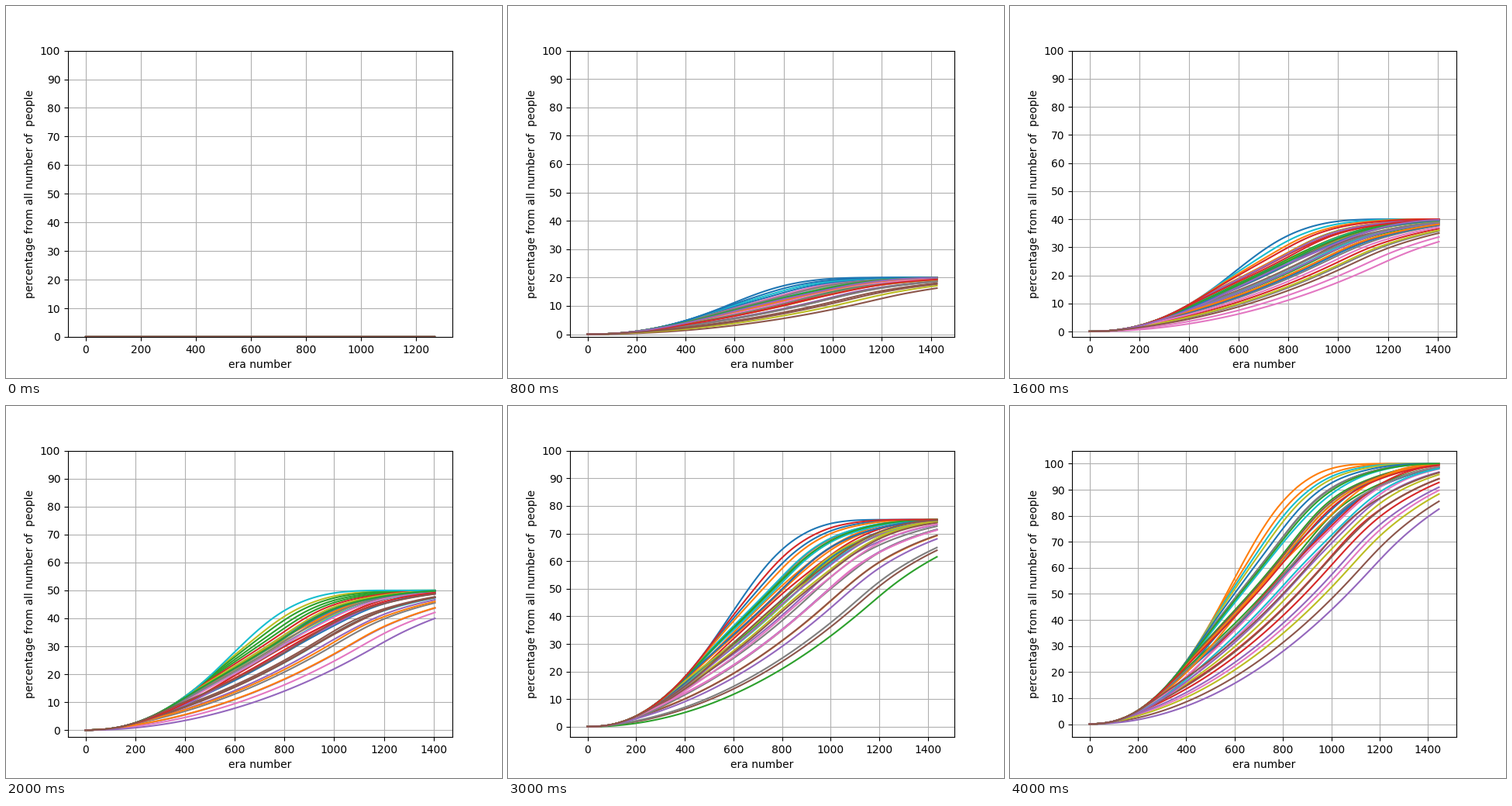
Write a matplotlib script that moves like this. It is 640x480 px and loops after 4200 ms.

```python
import numpy as np
import matplotlib.pyplot as plt
from matplotlib.animation import FuncAnimation

STEPS = 21
LINES = 36
ERA_STEP = 20
START_DELAY = 35
CROSSING_ERAS = 1185   # eras the news needs to cross the town
METRIC = 1.3           # between city-block and straight-line distance
FIRST_SHARE = 0.0004   # the one person who knows at the start

# Key points (step, last era) of the run length, joined by straight lines.
RUN_LENGTH = [(0, 1268), (1, 1450), (3, 1531), (4, 1425), (8, 1405),
              (12, 1405), (15, 1437), (16, 1544), (17, 1498), (18, 1553),
              (20, 1445)]

eras = np.arange(0, 1741, ERA_STEP)
cells = (np.arange(80) + 0.5) / 80
kernel = np.hanning(13)
kernel /= kernel.sum()


def source_point(level, tilt):
    """Source whose news reaches `level` percent of the town by era 800,
    between the diagonal (tilt 0) and the mid line (tilt 1)."""
    depth = np.interp(level, [26, 40, 54, 70, 80, 85], np.linspace(0, 0.5, 6))
    diagonal = np.array([depth, depth])
    edge = np.array([np.interp(level, [45, 85], [0, 0.5]), 0.5])
    return (1 - tilt) * diagonal + tilt * edge


def spread(source):
    """Share of the town reached in each era by a front leaving the source."""
    dx, dy = (np.abs(cells - c) ** METRIC for c in source)
    distance = (dx[:, None] + dy[None, :]) ** (1 / METRIC)
    arrival = START_DELAY + CROSSING_ERAS * distance
    counts, _ = np.histogram(arrival, bins=eras)
    share = np.concatenate([[0], np.cumsum(counts)]) / distance.size
    share = np.convolve(share, kernel, mode="same")
    share[0] = FIRST_SHARE
    return share


def choose_sources(step, rng):
    """Most runs bunch around the middle; the bunch loosens with each step."""
    line = np.arange(LINES)
    pace = rng.normal(size=LINES) + 0.8 * np.cos(2 * np.pi * (line - 0.5) / 10)
    rank = np.argsort(np.argsort(pace))
    offset = 2 * rank / (LINES - 1) - 1
    looseness = 0.2 + 0.5 * step / (STEPS - 1)
    levels = 55 + 27 * (looseness * offset + (1 - looseness) * offset ** 3)
    tilts = rng.random(LINES) * (1 - np.abs(offset))
    return [source_point(level, tilt) for level, tilt in zip(levels, tilts)]


def draw(step):
    rng = np.random.default_rng(100 + step)
    x = np.linspace(0, np.interp(step, *zip(*RUN_LENGTH)), 90)
    ax.clear()
    for source in choose_sources(step, rng):
        ax.plot(x, 5 * step * np.interp(x, eras, spread(source)))
    ax.set_yticks(np.arange(0, 101, 10))
    ax.set_xlabel("era number")
    ax.set_ylabel("percentage from all number of  people")
    ax.grid(True)


fig, ax = plt.subplots(figsize=(6.4, 4.8), dpi=100)
animation = FuncAnimation(fig, draw, frames=STEPS, interval=200,
                          repeat=True, repeat_delay=0)
plt.show()
```
